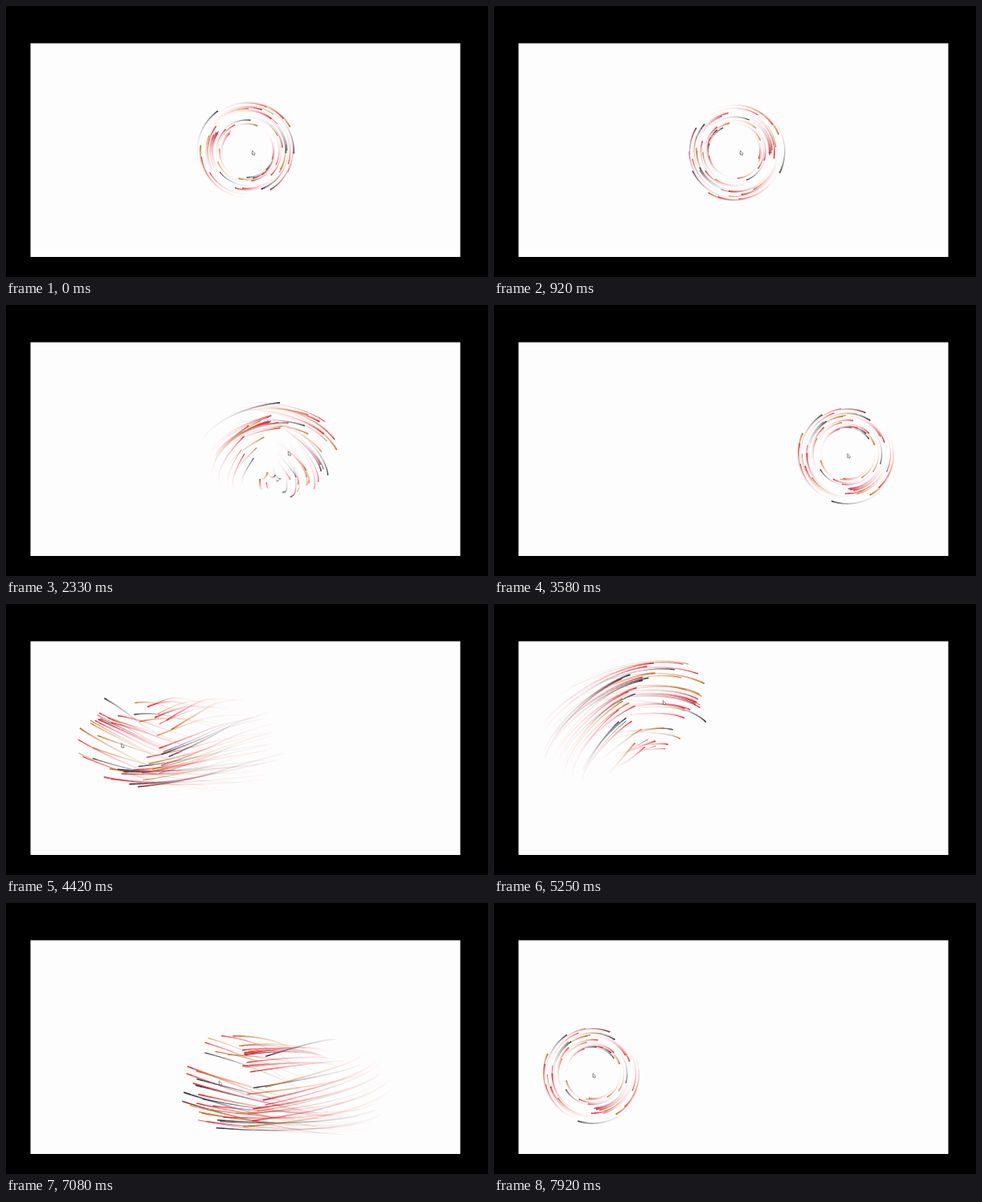
These frames come from a looping animation (600 px wide and 338 px high, 8000 ms). An HTML page with a canvas:

```html
<!DOCTYPE html>
<html lang="en">
<head>
<meta charset="utf-8">
<title>Orbiting trails</title>
<style>
  html, body { margin: 0; width: 100%; height: 100%; overflow: hidden; background: #000; }
  canvas { display: block; }
</style>
</head>
<body>
<canvas id="stage" width="600" height="338"></canvas>
<script>
const ctx = document.getElementById('stage').getContext('2d');
const LOOP = 8000, FRAME = LOOP / 96;
const SPIN = 2 * Math.PI / 2170;   // radians per ms
const STEP = 0.05 / SPIN;          // ms per trail segment
const SEGMENTS = 22, FADE = 0.86;
const COUNT = 54, INNER = 31, OUTER = 62;
const COLORS = ['#30343d', '#e62e38', '#c9722b'];

function seededRandom(seed) {
  return () => {
    seed = (seed + 0x6D2B79F5) | 0;
    let t = Math.imul(seed ^ (seed >>> 15), 1 | seed);
    t = (t + Math.imul(t ^ (t >>> 7), 61 | t)) ^ t;
    return ((t ^ (t >>> 14)) >>> 0) / 2 ** 32;
  };
}

const random = seededRandom(11);
const particles = Array.from({ length: COUNT }, () => ({
  color: COLORS[Math.floor(random() * COLORS.length)],
  width: 0.8 + 1.2 * random(),
  angle: 2 * Math.PI * random(),
  radius: INNER + (OUTER - INNER) * random()
}));

// Key points of the orbit centre.
const path = [
  { t: 1800, x: 300, y: 181 },
  { t: 2330, x: 350, y: 183 },
  { t: 3250, x: 440, y: 186 },
  { t: 3600, x: 440, y: 186 },
  { t: 4200, x: 215, y: 177 },
  { t: 4700, x: 95, y: 170 },
  { t: 5250, x: 208, y: 121 },
  { t: 5700, x: 335, y: 128 },
  { t: 6170, x: 395, y: 178 },
  { t: 6600, x: 425, y: 233 },
  { t: 7550, x: 123, y: 213 }
];

function slope(i, axis) {
  if (i === 0 || i === path.length - 1) return 0;
  const rate = j => (path[j + 1][axis] - path[j][axis]) / (path[j + 1].t - path[j].t);
  const before = rate(i - 1), after = rate(i);
  return before * after > 0 ? 2 * before * after / (before + after) : 0;
}

// Smooth interpolation that never overshoots the key points.
function centre(time) {
  const t = Math.min(Math.max(time, path[0].t), path.at(-1).t);
  const next = Math.max(1, path.findIndex(key => key.t >= t));
  const a = path[next - 1], b = path[next], span = b.t - a.t;
  const u = (t - a.t) / span, v = 1 - u;
  const blend = axis =>
    a[axis] * v * v * (1 + 2 * u) + b[axis] * u * u * (1 + 2 * v) +
    span * u * v * (slope(next - 1, axis) * v - slope(next, axis) * u);
  return { x: blend('x'), y: blend('y') };
}

function position(particle, time, middle) {
  const angle = particle.angle + time * SPIN;
  return [
    middle.x + Math.cos(angle) * particle.radius,
    middle.y + Math.sin(angle) * particle.radius
  ];
}

function drawTrails(time) {
  for (let k = SEGMENTS; k >= 0; k--) {
    const to = time - k * STEP, from = to - STEP;
    const middleTo = centre(to), middleFrom = centre(from);
    ctx.globalAlpha = FADE ** k;
    for (const particle of particles) {
      ctx.strokeStyle = particle.color;
      ctx.lineWidth = particle.width;
      ctx.beginPath();
      ctx.moveTo(...position(particle, from, middleFrom));
      ctx.lineTo(...position(particle, to, middleTo));
      ctx.stroke();
    }
  }
  ctx.globalAlpha = 1;
}

function drawCursor(time) {
  const { x, y } = centre(time + 10);
  const restX = 306.5;   // the pointer waits right of the first orbit
  ctx.save();
  ctx.translate(time < path[1].t ? Math.max(x, restX) : x, y - 0.5);
  ctx.beginPath();
  ctx.moveTo(0, 0);
  ctx.lineTo(0, 5);
  ctx.lineTo(1.5, 4);
  ctx.lineTo(2.5, 5.8);
  ctx.lineTo(3.6, 3.5);
  ctx.closePath();
  ctx.fillStyle = '#fff';
  ctx.fill();
  ctx.strokeStyle = '#555';
  ctx.lineWidth = 0.7;
  ctx.stroke();
  ctx.restore();
}

function render(now) {
  const time = Math.floor((now % LOOP + 5) / FRAME) * FRAME % LOOP;
  ctx.fillStyle = '#000';
  ctx.fillRect(0, 0, 600, 338);
  ctx.fillStyle = '#fefdfe';
  ctx.fillRect(30.5, 46.5, 535, 266.5);
  drawTrails(time);
  drawCursor(time);
  requestAnimationFrame(render);
}

requestAnimationFrame(render);
</script>
</body>
</html>
```
